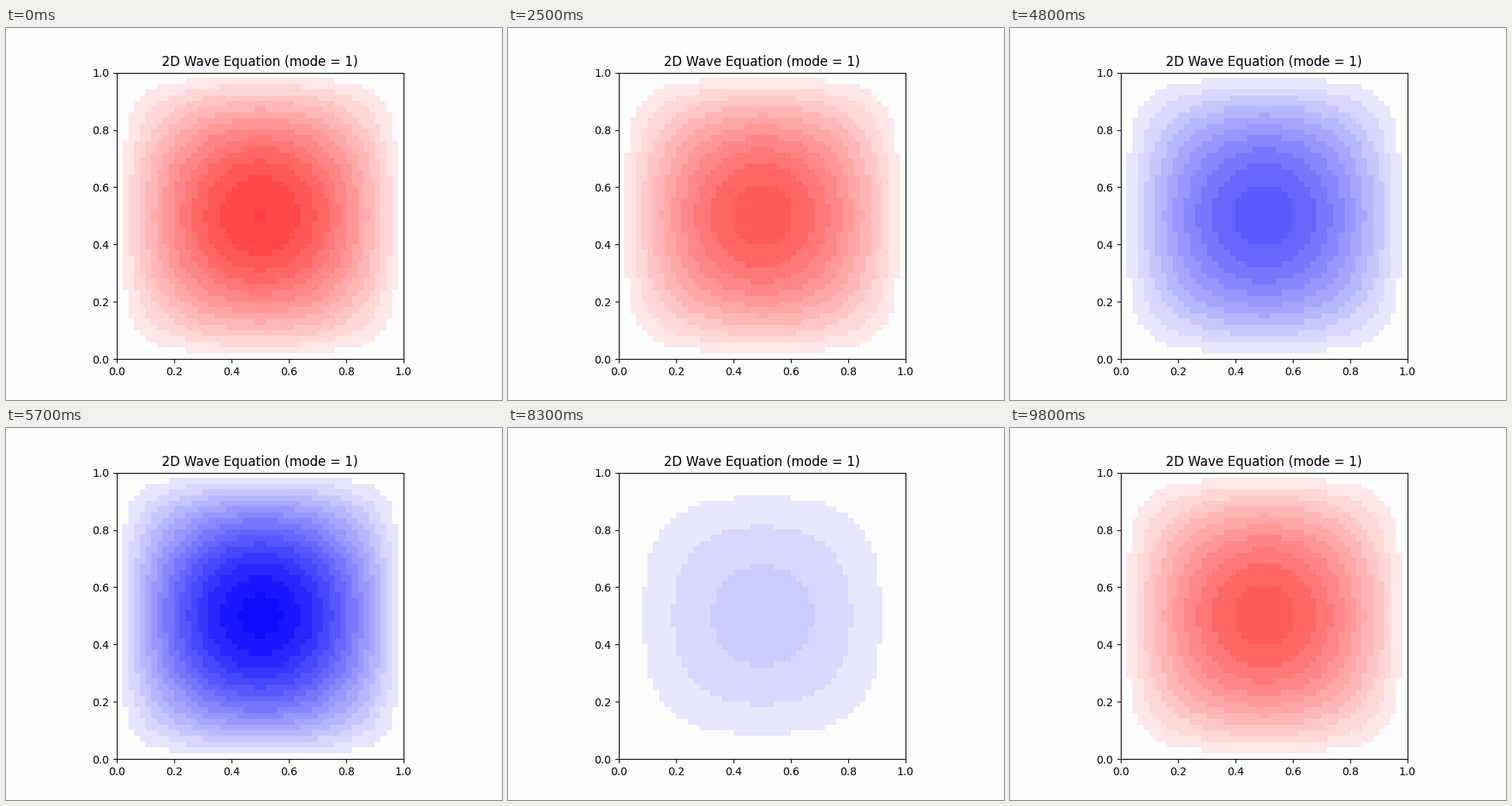
Write a matplotlib script that moves like this. It is 640x480 px and loops after 9900 ms.

```python
import numpy as np
import matplotlib.pyplot as plt
from matplotlib.animation import FuncAnimation

CELLS = 50
FRAMES = 99
HALF_PERIOD = 50      # frames between a crest and the next trough
CREST = 11.5          # frame position of the first crest
BAND = 16             # colour steps merged into one flat band

fig, ax = plt.subplots(figsize=(6.4, 4.8), dpi=100)
W, H = 640, 480
SIDE = 0.77 * H
CELL_AREA = (SIDE / CELLS) ** 2
MARGIN_AREA = W * H - SIDE ** 2

# Lowest mode of a square membrane on interior grid points, peak height 1
s = np.sin(np.pi * np.arange(1, CELLS + 1) / (CELLS + 1))
mode = np.outer(s, s)
mode /= mode.max()


def tint(level, positive):
    """Colour between white and red (positive) or blue."""
    return (254, level, level) if positive else (level, level, 254)


def banded(n):
    """Return the RGB cells and the paper colour at frame n."""
    amp = np.cos(np.pi * (n - CREST) / HALF_PERIOD)
    index = np.clip(np.floor(128 * (1 + amp * mode)), 0, 255).astype(int)
    positive = amp >= 0
    level = 510 - 2 * index if positive else 2 * index
    band = level // BAND

    rgb = np.empty((CELLS, CELLS, 3), np.uint8)
    paper = None
    for b in np.unique(band):
        inside = band == b
        if b == 255 // BAND:
            area = inside.sum() * CELL_AREA
            total = level[inside].sum() * CELL_AREA + 255 * MARGIN_AREA
            mean = min(int(total / (area + MARGIN_AREA)), 254)
            paper = tint(mean, positive)
            rgb[inside] = paper
        else:
            color = tint(int(level[inside].mean()), positive)
            rgb[inside] = [255 if c == 254 else c for c in color]
    return rgb, paper or (254, 254, 254)


image = ax.imshow(banded(0)[0], extent=(0, 1, 0, 1), origin="lower",
                  interpolation="nearest")
ax.set_title("2D Wave Equation (mode = 1)")


def draw(n):
    rgb, paper = banded(n)
    image.set_data(rgb)
    face = [c / 255 for c in paper]
    fig.set_facecolor(face)
    ax.set_facecolor(face)
    return [image]


anim = FuncAnimation(fig, draw, frames=FRAMES, interval=100,
                     repeat=True, repeat_delay=0, blit=False)
plt.show()
```
